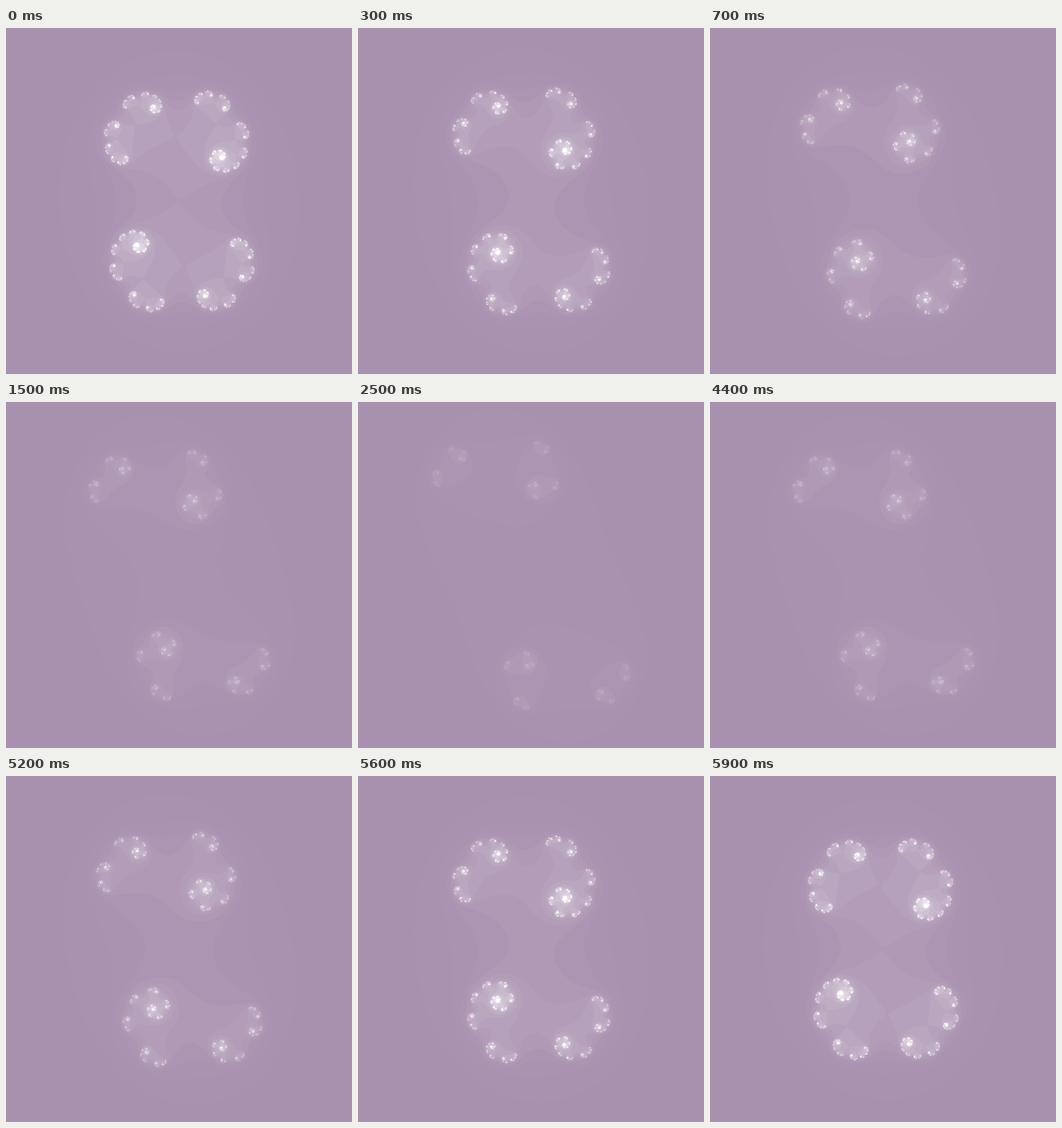
An HTML page with a canvas for the animation above (6000 ms loop, 500 px wide and 500 px high).

```html
<!DOCTYPE html>
<html>
<head>
<meta charset="utf-8">
<style>
  html, body { margin: 0; width: 100%; height: 100%; overflow: hidden; background: #a890af; }
  canvas { display: block; }
</style>
</head>
<body>
<canvas id="stage" width="500" height="500"></canvas>
<script>
const SIZE = 500, HALF = SIZE / 2, SCALE = SIZE / 3.6;
const STEP_MS = 100, STEPS = 30, MAX_ITER = 18;
const BASE = [168, 144, 175];

const ctx = document.getElementById("stage").getContext("2d");
const image = ctx.createImageData(SIZE, SIZE);
const pixels = new Uint32Array(image.data.buffer);

// Escape count -> colour, fading from purple to white
const palette = Array.from({ length: MAX_ITER + 1 }, (_, n) => {
  const t = (n / MAX_ITER) ** 2;
  const [r, g, b] = BASE.map(v => Math.round(v + (255 - v) * t));
  return (255 << 24 | b << 16 | g << 8 | r) >>> 0;
});

function escapeCount(x, y, cx, cy) {
  let n = 0;
  while (n < MAX_ITER && x * x + y * y <= 4) {
    const next = x * x - y * y + cx;
    y = 2 * x * y + cy;
    x = next;
    n++;
  }
  return n;
}

function drawJulia(cx, cy) {
  for (let py = 0, i = 0; py < SIZE; py++) {
    for (let px = 0; px < SIZE; px++, i++) {
      pixels[i] = palette[escapeCount((px - HALF) / SCALE, (py - HALF) / SCALE, cx, cy)];
    }
  }
  ctx.putImageData(image, 0, 0);
}

let shown = -1;
const start = performance.now();

function tick() {
  const frame = Math.floor((performance.now() - start) / STEP_MS) % (2 * STEPS);
  const k = Math.min(frame, 2 * STEPS - 1 - frame); // there and back
  if (k !== shown) {
    shown = k;
    drawJulia(0.4565 + 0.0183 * k, -0.058 - 0.032 * k);
  }
  requestAnimationFrame(tick);
}
tick();
</script>
</body>
</html>
```
